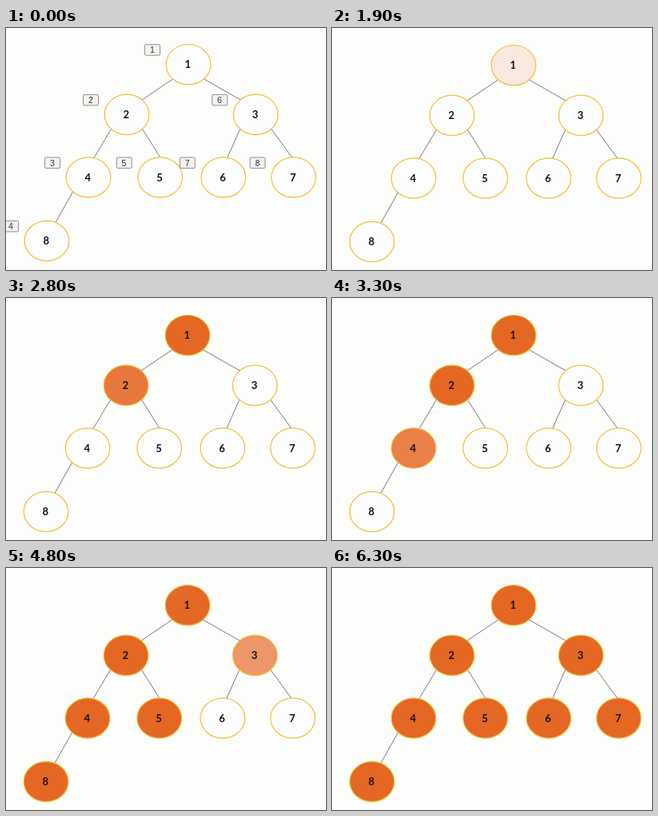
Recreate the animation shown at these times as an HTML page. Size 400x303 px, loop 6700 ms.

```html
<!DOCTYPE html>
<html lang="en">
<head>
<meta charset="utf-8">
<title>Preorder traversal</title>
<style>
  html, body { margin: 0; width: 100%; height: 100%; overflow: hidden; background: #fdfdfb; }
  svg { display: block; width: 100vw; height: 100vh; }
  text { text-anchor: middle; }
  .edge { stroke: #6b6b78; stroke-width: 0.9; }
  .node { stroke: #f4be38; stroke-width: 1.2; }
  .value { font: 700 13px Lato, "Open Sans", sans-serif; fill: #12121c; }
  .tag { fill: #f2f2ee; stroke: #85858a; stroke-width: 0.9; }
  .order { font: 10.5px "Liberation Sans", sans-serif; fill: #33333a; }
</style>
</head>
<body>
<svg viewBox="0 0 400 303">
  <g id="tree"></g>
  <g id="tags"></g>
</svg>
<script>
const LOOP = 6700, STEP = 100, REVEAL = 1800;
const FIRST_FADE = 1833, FADE_GAP = 525, FADE = 500;
const RX = 27.8, RY = 25.2;
const EMPTY = [253, 253, 254], VISITED = [228, 103, 36];

// Binary heap order: the children of node n are 2n and 2n + 1.
const levels = [45.7, 108.4, 187, 266.5];
const centres = [228, 151, 312.2, 103, 192.7, 271.8, 359.5, 51];
// Where the edge from the parent touches each node, measured from its centre.
const contacts = [0, 19, -19, 7, 0, 5, -2, 11];

const tree = document.getElementById('tree');
const tagLayer = document.getElementById('tags');
const visited = [];

function add(parent, tag, attrs, content = '') {
  const el = document.createElementNS('http://www.w3.org/2000/svg', tag);
  for (const key in attrs) el.setAttribute(key, attrs[key]);
  el.textContent = content;
  return parent.appendChild(el);
}

function centre(n) {
  return { x: centres[n - 1], y: levels[Math.floor(Math.log2(n))] };
}

function drawEdge(n) {
  const from = centre(n >> 1), to = centre(n);
  const side = n % 2 ? 1 : -1, contact = contacts[n - 1];
  add(tree, 'line', {
    class: 'edge',
    x1: from.x + side * RX * Math.SQRT1_2,
    y1: from.y + RY * Math.SQRT1_2 + 0.5,
    x2: to.x + contact,
    y2: to.y - RY * Math.sqrt(1 - (contact / RX) ** 2)
  });
}

function visit(n) {
  if (n > centres.length) return;
  const { x, y } = centre(n);
  if (n > 1) drawEdge(n);
  visited.push(add(tree, 'ellipse', { class: 'node', cx: x, cy: y, rx: RX, ry: RY }));
  add(tree, 'text', { class: 'value', x: x - 0.8, y: y + 4.7 }, n);
  add(tagLayer, 'rect', { class: 'tag', x: x - 54.5, y: y - 25, width: 19, height: 13.5, rx: 1.5 });
  add(tagLayer, 'text', { class: 'order', x: x - 45.2, y: y - 14.4 }, visited.length);
  visit(2 * n);
  visit(2 * n + 1);
}

function fillAt(progress) {
  const p = Math.min(1, Math.max(0, progress));
  return `rgb(${EMPTY.map((c, i) => Math.round(c + (VISITED[i] - c) * p))})`;
}

function draw(elapsed) {
  const t = Math.floor((elapsed % LOOP) / STEP) * STEP;
  const running = t >= REVEAL;
  tagLayer.setAttribute('visibility', running ? 'hidden' : 'visible');
  tree.setAttribute('transform', running ? 'translate(-1 1)' : 'translate(0 0)');
  visited.forEach((disc, i) => {
    disc.style.fill = fillAt((t - FIRST_FADE - i * FADE_GAP) / FADE);
  });
}

visit(1);
const origin = performance.now();
function tick() {
  draw(performance.now() - origin);
  requestAnimationFrame(tick);
}
tick();
</script>
</body>
</html>
```
